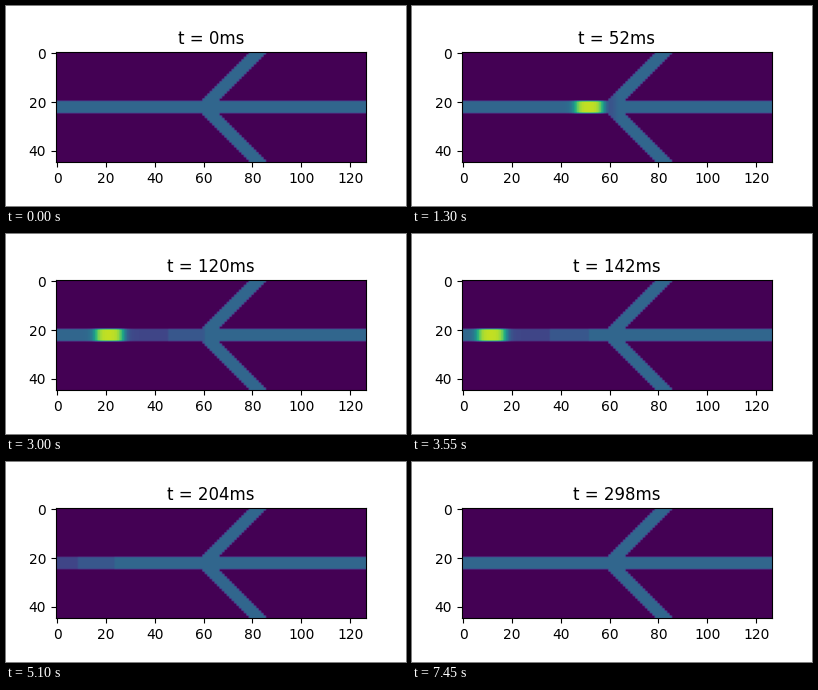
Animation, 400 px wide and 200 px high, one loop 7500 ms. Source, as a matplotlib script:

```python
import numpy as np
import matplotlib.pyplot as plt
from matplotlib.animation import FuncAnimation

ROWS, COLS = 45, 127
FRAMES, INTERVAL, DT = 150, 50, 2
REST, PEAK, DIP = 0.33, 0.91, 0.06
SPEED = 0.445  # columns per ms
MID_ROW, JUNCTION = ROWS // 2, 60

row, col = np.mgrid[:ROWS, :COLS]
off = np.abs(row - MID_ROW)
fibre = (off <= 2) | (np.abs(col - JUNCTION - off) <= 3)

x = np.arange(COLS)
# The pulse fades out to the right of the junction
gate = np.clip((JUNCTION + 3.5 - x) / 4, 0, 1)


def sigmoid(z):
    return 1 / (1 + np.exp(-z))


def pulse(d):
    """Level at distance d behind the centre of the wave."""
    front = sigmoid((d + 5.7) / 0.9)
    back = sigmoid((d - 5.7) / 0.95)
    # Undershoot recovers in two equal steps
    steps = np.clip(np.ceil((39.6 - d) / 15.6), 0, 2)
    tail = REST - DIP * steps
    return REST + (PEAK - REST) * front + (tail - PEAK) * back


def voltage(t):
    centre = 74.8 - SPEED * t
    return np.where(fibre, REST + (pulse(x - centre) - REST) * gate, 0)


fig, ax = plt.subplots(figsize=(4, 2), dpi=100)
image = ax.imshow(voltage(0), cmap="viridis", vmin=0, vmax=1)
title = ax.set_title("t = 0ms")


def update(i):
    t = i * DT
    image.set_data(voltage(t))
    title.set_text(f"t = {t}ms")
    return image, title


anim = FuncAnimation(fig, update, frames=FRAMES, interval=INTERVAL,
                     repeat=True, repeat_delay=0, blit=False)
plt.show()
```
